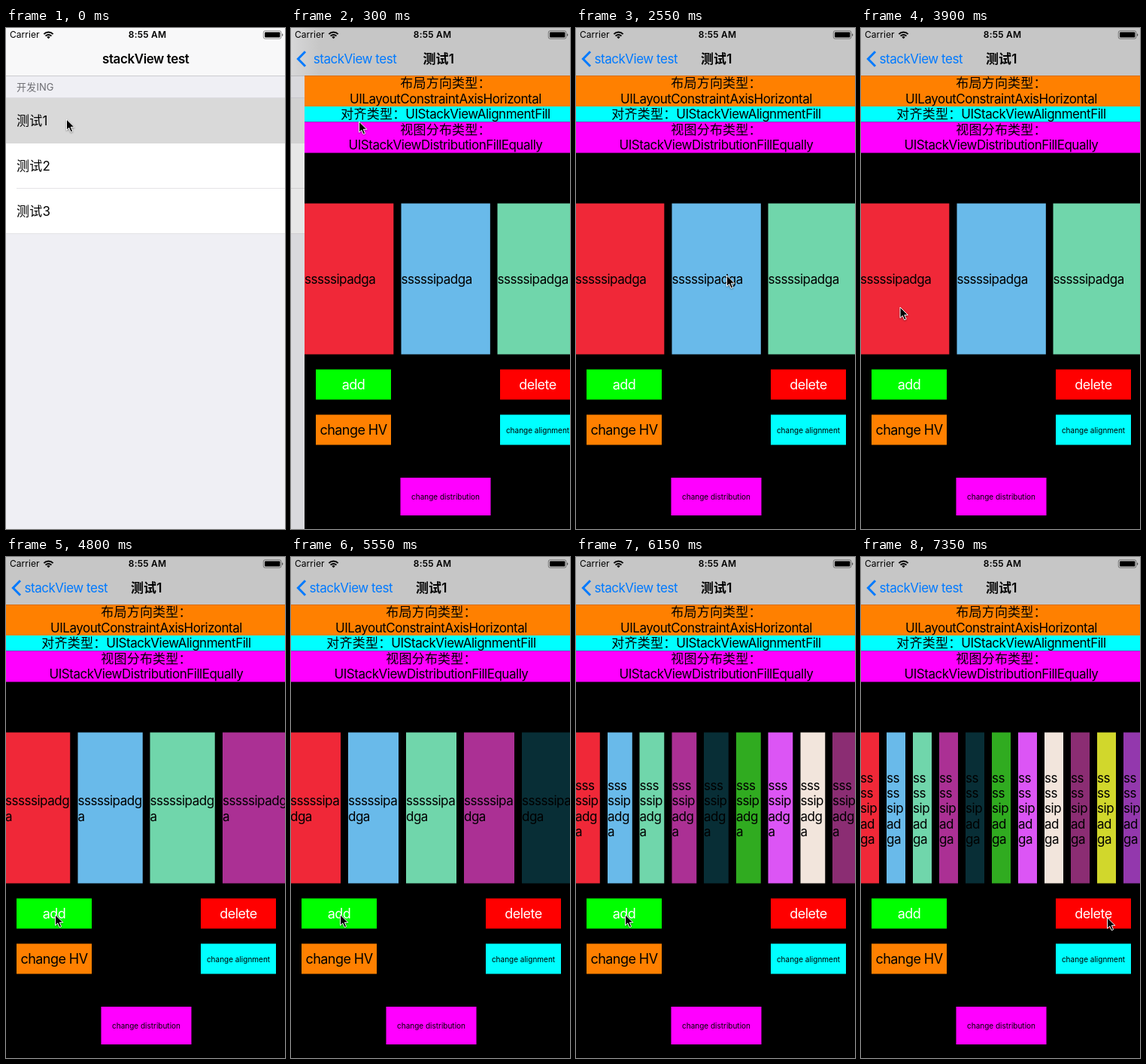
Write an HTML page that moves like this. It is 371x664 px and loops after 8000 ms.

```html
<!DOCTYPE html>
<html lang="zh-CN">
<head>
<meta charset="utf-8">
<title>Stack view demo</title>
<style>
html, body { margin: 0; width: 100%; height: 100%; overflow: hidden; background: #efeff4; }
#stage {
  position: relative; width: 371px; height: 664px; overflow: hidden; background: #efeff4;
  font: 17px/20.3px Inter, "Noto Sans CJK SC", "Noto Sans CJK", sans-serif;
  letter-spacing: -.48px; color: #000;
}
#stage div, #stage svg { position: absolute; white-space: nowrap; }
.zh { letter-spacing: .2px; }
.text { display: flex; align-items: center; }
.center { justify-content: center; text-align: center; }
.layer { left: 0; top: 0; width: 375px; height: 664px; }
#next, #dim { background: #000; }
#bar { left: 0; top: 0; width: 371px; height: 63px; }
.title { font-weight: 600; letter-spacing: -.41px; }
.blue { color: #007aff; }
.white { color: #fff; }
.header { font-size: 13px; letter-spacing: 0; color: #6d6d72; }
.button { font-size: 18px; letter-spacing: -.55px; }
.small { font-size: 10px; letter-spacing: 0; }
.status { font-size: 12px; letter-spacing: .05px; }
.clock { font-weight: 600; letter-spacing: .2px; }
</style>
</head>
<body>
<div id="stage">
  <div id="list" class="layer"><svg class="layer"></svg></div>
  <div id="dim" class="layer"></div>
  <div id="next" class="layer"><svg class="layer"></svg></div>
  <div id="bar"></div>
  <div id="nav" class="layer"></div>
  <svg width="371" height="66" style="left:0;top:0">
    <rect y="63" width="371" height=".5" fill-opacity=".3"/>
    <path id="chevron" d="M19 31.2 9.4 41 19 50.8" fill="none" stroke="#007aff" stroke-width="3"/>
    <path d="M50.4 8.1a8.6 8.6 0 0 1 12.2 0M52.6 10.6a5.5 5.5 0 0 1 7.8 0" fill="none" stroke="#000" stroke-width="2"/>
    <path d="M56.5 14.2 54.3 12a3.1 3.1 0 0 1 4.4 0z"/>
    <rect x="342.3" y="3.8" width="23.6" height="10.4" rx="2.2" fill="none" stroke="#000" stroke-width=".6" stroke-opacity=".7"/>
    <rect x="344" y="5.4" width="20.4" height="7.2" rx="1"/>
    <path d="M367 7.2a2 2 0 0 1 0 3.8z" fill-opacity=".6"/>
  </svg>
  <svg id="cursor" width="20" height="24" viewBox="-2 -2 20 24" style="left:-2px;top:-2px;filter:drop-shadow(0 1px 1px #0006)">
    <path d="M0 0V14.3L3.3 11.3 5.7 16.8 8.1 15.8 5.8 10.3H10.3Z" stroke="#fff"/>
  </svg>
</div>
<script>
const LOOP = 8000, TICK = 150, WIDTH = 375, GAP = 10;
const $ = id => document.getElementById(id);
const mark = s => s.replace(/[^\x00-\x7f]+/g, '<span class="zh">$&</span>');

// SVG rectangles keep their half-pixel edges
function rect(parent, x, y, width, height, fill) {
  const el = document.createElementNS('http://www.w3.org/2000/svg', 'rect');
  for (const [k, v] of Object.entries({ x, y, width, height, fill })) el.setAttribute(k, v);
  parent.append(el);
  return el;
}

function text(parent, x, y, w, h, str, cls = '') {
  const el = document.createElement('div');
  el.className = 'text ' + cls;
  el.style.cssText = `left:${x}px;top:${y}px;width:${w}px;height:${h}px`;
  el.innerHTML = `<span>${mark(str)}</span>`;
  parent.append(el);
  return el;
}

// List page
const list = $('list'), listArt = list.firstChild;
text(list, 14, 64, 200, 29, '开发ING', 'header');
rect(listArt, 0, 93, WIDTH, 180, '#fff');
const selected = rect(listArt, 0, 93, WIDTH, 60, '#d9d9d9');
[1, 2, 3].forEach(n => text(list, 14, 33 + n * 60, 200, 60, '测试' + n));
[[0, 92.5], [14, 212.5], [0, 272.5]].forEach(([x, y]) => rect(listArt, x, y, WIDTH, .5, '#c8c7cc'));

// Stack view page
const next = $('next'), art = next.firstChild;
function label(y, h, fill, str) {
  rect(art, 0, y, WIDTH, h, fill);
  text(next, 0, y, WIDTH, h, str, 'center');
}
label(63, 41, '#ff8000', '布局方向类型：<br>UILayoutConstraintAxisHorizontal');
label(104, 20.5, '#0ff', '对齐类型：UIStackViewAlignmentFill');
label(124.5, 41, '#f0f', '视图分布类型：<br>UIStackViewDistributionFillEqually');

function button(x, y, w, h, fill, str, cls = '') {
  rect(art, x, y, w, h, fill);
  text(next, x, Math.ceil(y), w, h, str, 'center button ' + cls);
}
button(15, 452.5, 100, 40, '#0f0', 'add', 'white');
button(260, 452.5, 100, 40, '#f00', 'delete', 'white');
button(15, 512.5, 100, 40, '#ff8000', 'change HV');
button(260, 512.5, 100, 40, '#0ff', 'change alignment', 'small');
button(127.5, 596, 120, 50, '#f0f', 'change distribution', 'small');

const columns = document.createElementNS('http://www.w3.org/2000/svg', 'g');
art.append(columns);
const stack = text(next, 0, 233, WIDTH, 200, '');

const COLORS = ['#f02838', '#69baea', '#70d6ab', '#ab3094', '#082e36', '#30ab20',
  '#dc55f5', '#f2e5dc', '#8b2d73', '#d1d72c', '#9338ad'];
// Wrapped label text for 3 to 11 columns
const WRAPS = ['sssssipadga', 'sssssipadg a', 'sssssipa dga', 'sssssi padga', 'sssss ipadg a',
  'ssss sipa dga', 'sss ssip adg a', 'sss ssi pa dg a', 'ss ss sip ad ga'];

let shown = 0;
function fillStack(n) {
  if (n === shown) return;
  shown = n;
  columns.replaceChildren();
  stack.replaceChildren();
  const w = (WIDTH - GAP * (n - 1)) / n;
  const str = WRAPS[n - 3].replaceAll(' ', '<br>');
  for (let i = 0; i < n; i++) {
    const x = Math.round(i * (w + GAP) * 2) / 2;
    rect(columns, x, 232.5, w, 200, COLORS[i]);
    text(stack, x, .5, w, 200, str);
  }
}

// Navigation and status texts
const nav = $('nav');
const oldTitle = text(nav, 0, 30, 130, 22, 'stackView test', 'title');
const backText = text(nav, 0, 30, 130, 22, 'stackView test', 'blue');
const newTitle = text(nav, 86.5, 30, 200, 22, '测试1', 'title center');
text(nav, 5, 2, 60, 15, 'Carrier', 'status');
text(nav, 138, 2, 100, 15, '8:55 AM', 'status clock center');

const OFFSETS = [375, 95, 19, 4, 1];

// Pointer keys: tick, x, y
const POINTER = [
  [0, 80.5, 121], [1, 82, 121], [2, 90.5, 124], [3, 94, 142], [5, 72, 168], [6, 72, 168],
  [7, 54, 215], [8, 52, 300], [9, 66, 360], [10, 130, 381], [11, 215, 375], [13, 336, 325],
  [14, 337, 310], [15, 305, 343], [16, 250, 358], [17, 200.5, 328], [18, 168, 235],
  [19, 150, 155], [20, 190, 120], [21, 247, 92], [22, 190, 74], [23, 120, 95], [24, 70, 180],
  [25, 48, 290], [26, 52, 370], [27, 58, 415], [28, 62, 440], [30, 65, 471], [31, 65.5, 474],
  [45, 65.5, 474], [46, 120, 489], [47, 215, 495], [48, 300, 486], [49, 327.5, 478]
];

function pointerAt(tick) {
  const i = POINTER.findIndex(k => k[0] >= tick);
  if (i < 0) return POINTER.at(-1).slice(1);
  const b = POINTER[i], a = POINTER[Math.max(0, i - 1)];
  const f = b[0] === a[0] ? 1 : (tick - a[0]) / (b[0] - a[0]);
  return [1, 2].map(c => a[c] + (b[c] - a[c]) * f);
}

function countAt(tick) {
  if (tick < 32) return 3;
  return tick < 37 ? 4 : Math.min(tick - 32, 11);
}

const move = (el, x, y = 0) => { el.style.transform = `translate(${x}px,${y}px)`; };

function push(off) {
  const p = 1 - off / WIDTH;
  move(next, off - 1);
  move(list, -Math.round(.3 * WIDTH * p));
  $('dim').style.opacity = .1 * p;
  const grey = 217 + 15 * p;
  selected.setAttribute('fill', `rgb(${grey},${grey},${grey})`);
  $('bar').style.background = p === 0 ? '#f8f8f9' : p === 1 ? '#c6c6c6'
    : `linear-gradient(90deg, #dadadb ${off - 25}px, #c6c6c6 ${off + 20}px)`;
  const x = 128 - 103.5 * p;
  move(oldTitle, x);
  move(backText, x);
  move(newTitle, off / 2);
  oldTitle.style.opacity = off < 30 ? 0 : 1 - p;
  const fade = off < 30 ? 1 : p;
  for (const el of [backText, newTitle, $('chevron')]) el.style.opacity = fade;
}

const start = performance.now();
function draw() {
  const tick = Math.floor(((performance.now() - start) % LOOP) / TICK);
  push(OFFSETS[tick] ?? 0);
  fillStack(countAt(tick));
  move($('cursor'), ...pointerAt(tick));
  requestAnimationFrame(draw);
}
draw();
</script>
</body>
</html>
```
